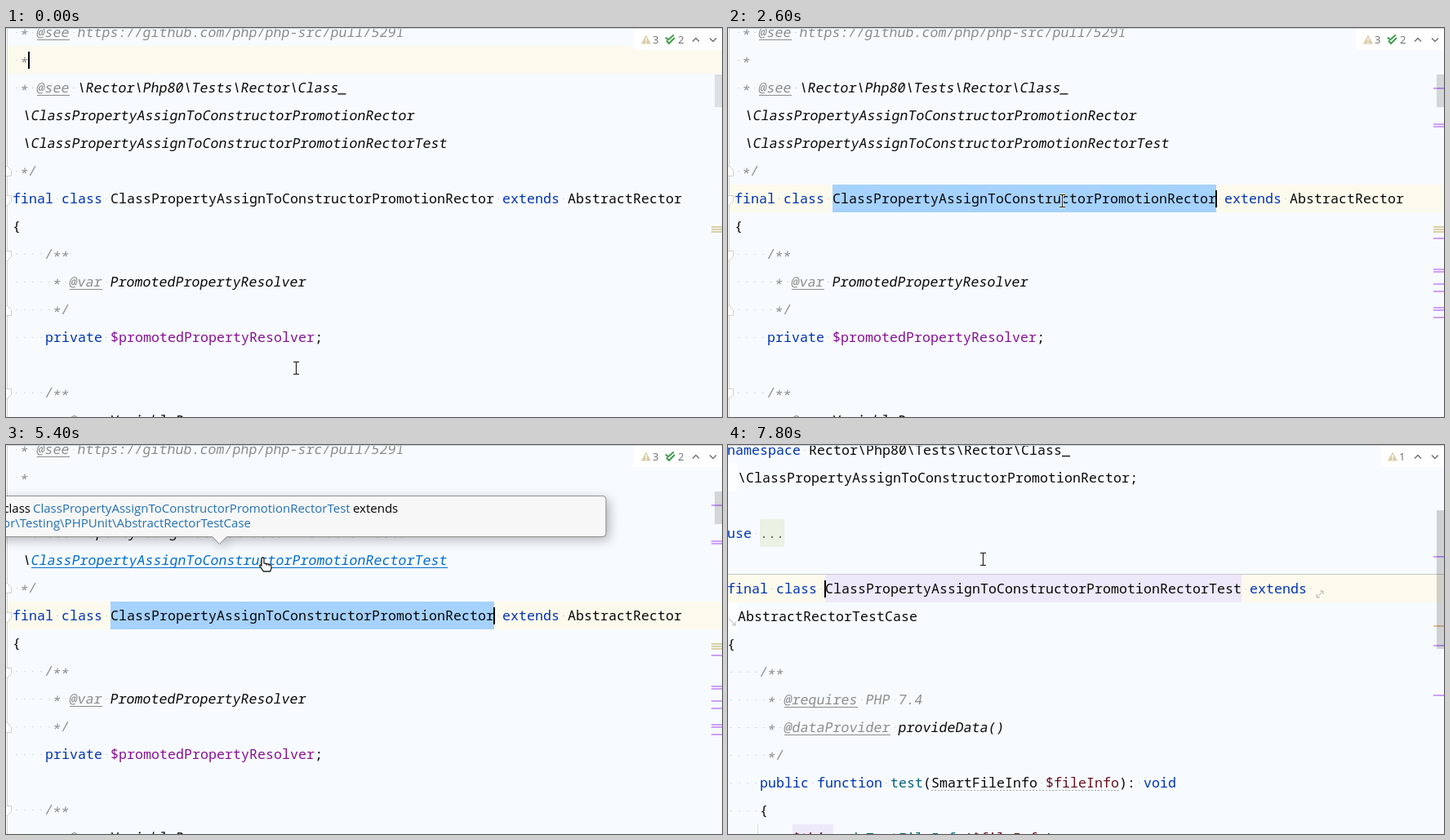
Animation of 877 by 477 pixels, one loop 8 s. Source, as an HTML page with a canvas:

```html
<!DOCTYPE html>
<html lang="en">
<head>
<meta charset="utf-8">
<title>Jump from class to test</title>
<style>
html, body { margin: 0; width: 100%; height: 100%; overflow: hidden; background: #f7fbff; }
canvas { display: block; }
</style>
</head>
<body>
<canvas id="stage" width="877" height="477"></canvas>
<script>
const ctx = document.getElementById('stage').getContext('2d');
const LOOP = 8000, STEP = 200, W = 877, H = 477;
const PITCH = 10, ROW = 34;
const CODE_FONT = '500 16.6px "Noto Sans Mono", "DejaVu Sans Mono", monospace';
const UI_FONT = '15px "Open Sans", "Noto Sans", sans-serif';
const COUNT_FONT = '13px "Open Sans", "Noto Sans", sans-serif';
const PURPLE = '#cf9ffa', TAN = '#d9d0a8', CARET_ROW = '#fcfaed';

const STYLES = {
  n: { color: '#080808' },
  k: { color: '#0033b3' },
  p: { color: '#871094' },
  f: { color: '#00627a' },
  v: { color: '#660e1a' },
  g: { color: '#5c6b50' },
  c: { color: '#8c8c8c', italic: true },
  t: { color: '#8c8c8c', italic: true, underline: true },
  d: { color: '#080808', italic: true },
  l: { color: '#006dcc', italic: true, underline: true }
};

// A row is a list of [style, text]; wrapped rows carry their own left edge.
const RECTOR = 'ClassPropertyAssignToConstructorPromotionRector';
const classFile = {
  left: 8, base: 11,
  rows: [
    [['c', ' * '], ['t', '@see'], ['c', ' https://github.com/php/php-src/pull/5291']],
    [['c', ' *']],
    [['c', ' * '], ['t', '@see'], ['d', ' \\Rector\\Php80\\Tests\\Rector\\Class_']],
    [['d', '\\' + RECTOR]],
    [['d', '\\'], ['d', RECTOR + 'Test']],
    [['c', ' */']],
    [['k', 'final class '], ['n', RECTOR], ['k', ' extends '], ['n', 'AbstractRector']],
    [['n', '{']],
    [['c', '    /**']],
    [['c', '     * '], ['t', '@var'], ['d', ' PromotedPropertyResolver']],
    [['c', '     */']],
    [['k', '    private '], ['p', '$promotedPropertyResolver'], ['n', ';']],
    [],
    [['c', '    /**']],
    [['c', '     * '], ['t', '@var'], ['d', ' VariableRenamer']]
  ],
  wrapped: { 3: 21, 4: 21 }
};
const testFile = {
  left: -1, base: 12,
  rows: [
    [['k', 'namespace '], ['n', 'Rector\\Php80\\Tests\\Rector\\Class_']],
    [['n', '\\' + RECTOR + ';']],
    [],
    [['k', 'use '], ['g', '...']],
    [],
    [['k', 'final class '], ['n', RECTOR + 'Test'], ['k', ' extends ']],
    [['n', 'AbstractRectorTestCase']],
    [['n', '{']],
    [['c', '    /**']],
    [['c', '     * '], ['t', '@requires'], ['c', ' PHP 7.4']],
    [['c', '     * '], ['t', '@dataProvider'], ['d', ' provideData()']],
    [['c', '     */']],
    [['k', '    public function '], ['f', 'test'], ['n', '(SmartFileInfo '], ['v', '$fileInfo'], ['n', '): '], ['k', 'void']],
    [['n', '    {']],
    [['v', '        $this'], ['n', '->'], ['f', 'doTestFileInfo'], ['n', '('], ['v', '$fileInfo'], ['n', ');']]
  ],
  wrapped: { 1: 12, 6: 12 }
};

function rect(x, y, w, h, color) {
  ctx.fillStyle = color;
  ctx.fillRect(x, y, w, h);
}

function line(points, color, width = 1) {
  ctx.beginPath();
  points.forEach(([x, y]) => ctx.lineTo(x, y));
  ctx.strokeStyle = color;
  ctx.lineWidth = width;
  ctx.stroke();
}

function label(text, x, y, color, font = UI_FONT, align = 'left') {
  ctx.font = font;
  ctx.textAlign = align;
  ctx.fillStyle = color;
  ctx.fillText(text, x, y);
}

function codeRow(segments, left, y) {
  let x = left;
  for (const [key, text] of segments) {
    const style = STYLES[key];
    const start = x;
    for (const char of text) {
      if (char === ' ') {
        rect(x + 4.5, y - 6, 1, 1, '#aeb2b6');
      } else {
        const drop = char === '*' ? 3 : 0;
        ctx.save();
        // Slant around the middle of the lower-case letters.
        if (style.italic) ctx.transform(1, 0, -0.16, 1, x - 1.2, y);
        else ctx.translate(x, y);
        label(char, 0, drop, style.color, CODE_FONT);
        ctx.restore();
      }
      x += PITCH;
    }
    if (style.underline) rect(start, y + 3, x - start, 1, style.color);
  }
}

function codeRows(file, linkRow) {
  file.rows.forEach((segments, i) => {
    const row = i === linkRow ? [segments[0], ['l', segments[1][1]]] : segments;
    codeRow(row, file.wrapped[i] ?? file.left, file.base + i * ROW);
  });
}

const rowTop = (file, i) => file.base + i * ROW - 23;

function caretAt(file, row, col) {
  rect(file.left + col * PITCH - 1, rowTop(file, row) + 7, 2, 21, '#000');
}

function highlight(file, row, col, length, color) {
  rect(file.left + col * PITCH, rowTop(file, row), length * PITCH, ROW, color);
}

function stripes(ys, color) {
  ys.forEach(y => rect(864, y - 1, 13, 2, color));
}

function foldMarker(y, dir) {
  ctx.beginPath();
  [[-1, -6], [1, -6], [6, -1], [6, 6], [-1, 6]].forEach(([x, dy]) => ctx.lineTo(x + .5, y + dy * dir + .5));
  ctx.fillStyle = '#fff';
  ctx.fill();
  ctx.strokeStyle = '#cfcfcf';
  ctx.lineWidth = 1;
  ctx.stroke();
}

function warning(x, count) {
  ctx.beginPath();
  [[x, 8.5], [x + 6, 19.5], [x - 6, 19.5]].forEach(p => ctx.lineTo(...p));
  ctx.fillStyle = '#d8cda6';
  ctx.fill();
  rect(x - .75, 12, 1.5, 4, '#fff');
  rect(x - .75, 17, 1.5, 1.5, '#fff');
  label(count, x + 8, 19, '#6c6c6c', COUNT_FONT);
}

function passed(count) {
  line([[808, 11.5], [811, 14.5], [818, 8.5]], '#3f9c4a', 2);
  line([[809, 15.5], [812, 19], [819, 12]], '#3f9c4a', 2);
  label(count, 823, 19, '#6c6c6c', COUNT_FONT);
}

function inspections(left, drawCounts) {
  rect(left, 1, W - left, 26, '#fff');
  drawCounts();
  line([[841, 16.5], [845, 12.5], [849, 16.5]], '#6e6e6e', 1.4);
  line([[862, 12.5], [866, 16.5], [870, 12.5]], '#6e6e6e', 1.4);
}

function bulb() {
  ctx.beginPath();
  ctx.arc(22, 182, 5.2, 0, 7);
  ctx.fillStyle = '#eda11a';
  ctx.fill();
  rect(19.5, 187, 5, 1, '#6e6e6e');
  rect(20, 189, 4, 1, '#6e6e6e');
}

function popup() {
  ctx.save();
  ctx.beginPath();
  ctx.roundRect(-20, 63, 754.5, 49, 4);
  ctx.moveTo(253, 112);
  ctx.lineTo(261.5, 121);
  ctx.lineTo(270, 112);
  ctx.shadowColor = 'rgba(0,0,0,.3)';
  ctx.shadowBlur = 14;
  ctx.shadowOffsetX = 4;
  ctx.shadowOffsetY = 4;
  ctx.fillStyle = '#f7f7f7';
  ctx.fill();
  ctx.restore();
  ctx.beginPath();
  ctx.roundRect(-20, 62.5, 755, 50, 4);
  ctx.strokeStyle = '#8f8f8f';
  ctx.lineWidth = 1;
  ctx.stroke();
  rect(253, 111, 17, 2, '#f7f7f7');
  line([[252.5, 112.5], [261.5, 121.5], [270.5, 112.5]], '#8f8f8f');
  label('class', 30, 83, '#000', UI_FONT, 'right');
  label(RECTOR + 'Test', 33, 83, '#2470b3');
  label('extends', 425, 83, '#000');
  label('Rector\\Testing\\PHPUnit\\AbstractRectorTestCase', 300, 101, '#2470b3', UI_FONT, 'right');
}

function textCursor(x, y) {
  x = Math.round(x) + .5;
  y = Math.round(y);
  for (const [color, width] of [['#fff', 3], ['#222', 1.2]]) {
    line([[x, y - 7], [x, y + 7]], color, width);
    for (const end of [y - 7.5, y + 7.5]) line([[x - 3.5, end], [x + 3.5, end]], color, width);
  }
}

const hand = new Path2D('M313 139q1.5-2 3 0v6l7 1.5q2 .5 2 3v2l-1.5 3.5h-8l-4.5-6q-1-2 1-2l1 1z');
function handCursor() {
  ctx.fillStyle = '#fff';
  ctx.fill(hand);
  ctx.strokeStyle = '#222';
  ctx.lineWidth = 1.3;
  ctx.stroke(hand);
  line([[319, 145.5], [319, 148]], '#222');
  line([[322, 146], [322, 148.5]], '#222');
}

// [time, x, y]
const pointerPath = [
  [0, 355, 417], [800, 443, 232], [1200, 443, 232], [1600, 425, 226], [2400, 425, 226],
  [2600, 409, 212], [3600, 190, 190], [4200, 42, 73], [4800, 316, 144], [LOOP, 316, 144]
];
function pointer(t) {
  const i = pointerPath.findIndex(p => p[0] > t);
  const [a, b] = [pointerPath[i - 1], pointerPath[i]];
  const u = (t - a[0]) / (b[0] - a[0]);
  const eased = u * u * (3 - 2 * u);
  return [a[1] + (b[1] - a[1]) * eased, a[2] + (b[2] - a[2]) * eased];
}

const within = (t, ranges) => ranges.some(([from, to]) => t >= from && t < to);
const caretOn = t => within(t, [[0, 400], [1000, 1400], [1600, 2000], [2600, 3000], [3600, 4200], [4800, 5800], [6400, 6800]]);

function drawClassFile(t) {
  const file = classFile;
  const selected = t >= 1600, marked = t >= 1800, linked = t >= 5400;
  const [row, col] = selected ? [6, 59] : t >= 1000 ? [7, 1] : [1, 2];
  rect(2, rowTop(file, row), W, ROW, CARET_ROW);
  if (selected) highlight(file, 6, 12, RECTOR.length, '#a6d2ff');
  else if (row === 7) highlight(file, 7, 0, 1, '#93d9d9');

  rect(0, 0, 1, H, '#fff');
  rect(1, 0, 1, H, '#d4d4d4');
  [211, 279, 448].forEach(y => foldMarker(y, -1));
  [175, 346].forEach(y => foldMarker(y, 1));

  codeRows(file, linked ? 4 : -1);
  if (caretOn(t)) caretAt(file, row, col);
  if (within(t, [[3400, 4600]])) bulb();

  stripes([244, 247, 250], TAN);
  if (marked) stripes([74, 118, 121, 258, 296, 299, 314, 323, 343, 346, 355], PURPLE);
  rect(868, 57, 9, 40, marked ? 'rgba(0,0,0,.15)' : 'rgba(0,0,0,.11)');

  inspections(769, () => {
    warning(784, '3');
    passed('2');
  });
  if (linked) {
    popup();
    handCursor();
  } else {
    textCursor(...pointer(t));
  }
}

function wrapArrow(x, y, dir) {
  line([[x - 4 * dir, y + 4], [x + 4 * dir, y - 4]], '#b4b4b4');
  line([[x - 4 * dir, y], [x - 4 * dir, y + 4], [x, y + 4]], '#b4b4b4');
  if (dir > 0) line([[x, y - 4], [x + 4, y - 4], [x + 4, y]], '#b4b4b4');
}

function drawTestFile(analysed) {
  const file = testFile;
  rect(0, rowTop(file, 5), W, ROW, CARET_ROW);
  rect(0, 158, W, 1, '#c6c9cb');
  [1, 6].forEach(i => rect(0, rowTop(file, i), 12, ROW, '#fdfeff'));
  highlight(file, 3, 4, 3, '#e9f2e3');
  if (analysed) {
    highlight(file, 5, 12, RECTOR.length + 4, '#ede9fb');
    highlight(file, 14, 8, 5, '#ede9fb');
  }
  rect(36, 465, 1, 12, '#dcdcdc');
  codeRows(file);
  wrapArrow(725, 183, 1);
  wrapArrow(5, 217, -1);
  if (analysed) {
    for (let x = 249; x < 479; x += 4) rect(x, 423, 2, 1, '#a9a9a9');
    stripes([137, 246, 307], PURPLE);
    stripes([222], '#e3c39a');
  }
  rect(868, 80, 9, 170, 'rgba(0,0,0,.17)');
  caretAt(file, 5, 12);
  inspections(800, () => { if (analysed) warning(814, '1'); });
  textCursor(312, 140);
}

function frame(now) {
  const t = Math.floor(now % LOOP / STEP) * STEP;
  rect(0, 0, W, H, '#f7fbff');
  if (t < 7600) drawClassFile(t);
  else drawTestFile(t >= 7800);
  rect(0, 0, W, 1, '#cdcfd1');
  requestAnimationFrame(frame);
}
requestAnimationFrame(frame);
</script>
</body>
</html>
```
